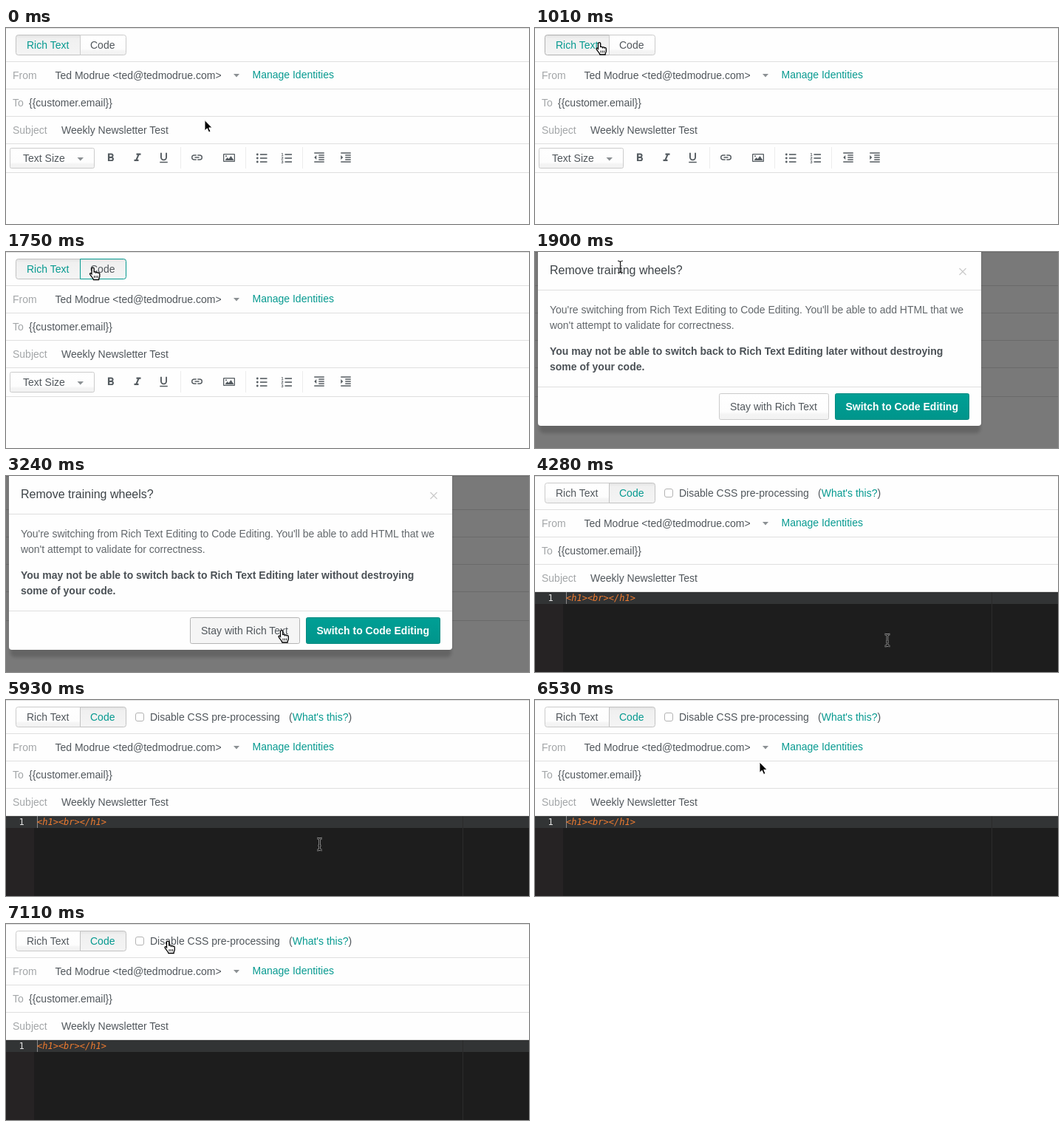
Animation, 708 px wide and 265 px high, one loop 8000 ms. Source, as an HTML page:

```html
<!DOCTYPE html>
<html lang="en">
<head>
<meta charset="utf-8">
<title>Message editor</title>
<style>
html, body { margin: 0; width: 100%; height: 100%; overflow: hidden; background: #fefefe; }
svg { display: block; width: 708px; height: 265px; }
text { font: 14px "Liberation Sans", Arial, sans-serif; fill: #51575c; white-space: pre; }
.dim { fill: #a3a6a8; }
.link { fill: #069a90; }
.title { font-size: 16px; fill: #3d4347; }
.body { fill: #62676b; letter-spacing: -.03px; }
.bold { font-weight: bold; fill: #4b5156; }
.mono { font: 12px "DejaVu Sans Mono", monospace; fill: #e2e2e2; }
.tag { font-style: italic; fill: #ee7b30; }
.rule { stroke: #dfdfdf; fill: none; }
.sep { stroke: #ececec; }
.btn { fill: url(#plain); stroke: #cbcbcb; }
.icon { fill: #555c61; }
.caret { fill: #8b9093; }
.switch { fill: url(#teal); stroke: #00897f; }

.code .rich-only, .rich .code-only, .modal, .cursor { display: none; }
.ask .modal { display: inline; }
.rich .tab-rich, .code .tab-code { fill: url(#pressed); stroke: #c2c2c2; }
.rich .label-rich, .code .label-code { fill: #069a90; }
.over-rich .tab-rich { stroke: #b0b0b0; }
.over-code .tab-code { stroke: #b4b4b4; }
.press-code .tab-code { fill: url(#pressed); stroke: #069a90; }
.over-stay .stay { fill: #f5f5f5; stroke: #b4b4b4; }
.over-switch .switch { fill: #008b82; stroke: #007d75; }
.press-switch .switch { fill: url(#tealDown); stroke: #00786f; }
</style>
</head>
<body>
<svg id="stage" class="rich" viewBox="0 0 708 265">
  <defs>
    <linearGradient id="plain" x2="0" y2="1">
      <stop offset="0" stop-color="#fff"/><stop offset=".7" stop-color="#fdfdfd"/>
      <stop offset=".8" stop-color="#f4f4f4"/><stop offset="1" stop-color="#f2f2f2"/>
    </linearGradient>
    <linearGradient id="pressed" x2="0" y2="1">
      <stop offset="0" stop-color="#e2e2e2"/><stop offset=".18" stop-color="#f0f0f0"/>
      <stop offset="1" stop-color="#f4f4f4"/>
    </linearGradient>
    <linearGradient id="teal" x2="0" y2="1">
      <stop offset="0" stop-color="#009f95"/><stop offset="1" stop-color="#00958b"/>
    </linearGradient>
    <linearGradient id="tealDown" x2="0" y2="1">
      <stop offset="0" stop-color="#007b73"/><stop offset=".15" stop-color="#008880"/>
      <stop offset="1" stop-color="#00847c"/>
    </linearGradient>
    <filter id="soft" x="-5%" width="110%" y="-10%" height="120%"><feGaussianBlur stdDeviation="2"/></filter>
  </defs>

  <rect width="708" height="265" fill="#fefefe"/>
  <path class="rule" d="M0 .5H708M0 45.5H708M0 82.5H708M0 119.5H708M0 156.5H708"/>

  <path class="btn tab-rich" d="M100.5 9.5H16.5a3 3 0 0 0-3 3v21a3 3 0 0 0 3 3h84z"/>
  <path class="btn tab-code" d="M100.5 9.5h59a3 3 0 0 1 3 3v21a3 3 0 0 1-3 3h-59z"/>
  <text class="label-rich" x="28" y="28">Rich Text</text>
  <text class="label-code" x="114" y="28">Code</text>

  <g class="code-only">
    <rect x="175.500" y="17.500" width="11" height="11" rx="2.500" fill="#fff" stroke="#b3b3b3"/>
    <text x="195" y="28">Disable CSS pre-processing</text>
    <text x="383" y="28">(<tspan class="link">What's this?</tspan>)</text>
  </g>

  <text class="dim" x="9" y="69">From</text>
  <text x="66.500" y="69">Ted Modrue &lt;ted@tedmodrue.com&gt;</text>
  <path class="caret" d="M308 62h8l-4 4.500z"/>
  <text class="link" x="333.500" y="68">Manage Identities</text>
  <text class="dim" x="9" y="106">To</text>
  <text x="31" y="106">{{customer.email}}</text>
  <text class="dim" x="9" y="143">Subject</text>
  <text x="75" y="143">Weekly Newsletter Test</text>

  <g class="rich-only">
    <path class="rule" d="M0 195.500H708"/>
    <rect class="btn" x="5.500" y="162.500" width="114" height="27" rx="2"/>
    <text x="23" y="181">Text Size</text>
    <path class="caret" d="M96.500 175h8.500l-4.250 4.500z"/>
    <path class="sep" d="M236.500 161v29M324.500 161v29M401.500 161v29"/>
    <g class="icon" id="icons">
      <path d="M294 171a1 1 0 0 1 1-1h14a1 1 0 0 1 1 1v9a1 1 0 0 1-1 1h-14a1 1 0 0 1-1-1zM295.300 171.300v8.400h13.400v-8.400z" fill-rule="evenodd"/>
      <path d="M296.500 179l3-4 2 2 3-4 4 6z"/><circle cx="298" cy="173.300" r="1"/>
    </g>
  </g>

  <g class="code-only">
    <rect y="157" width="708" height="108" fill="#1d1d1d"/>
    <rect y="157" width="38" height="108" fill="#262324"/>
    <rect y="157" width="708" height="16" fill="#323435"/>
    <path d="M618.500 157V265" stroke="#2b2b2b"/>
    <path d="M42.500 157v16" stroke="#8a8a8a"/>
    <text class="mono" x="17.500" y="169">1</text>
    <text class="mono tag" x="42" y="169">&lt;h1&gt;&lt;br&gt;&lt;/h1&gt;</text>
  </g>

  <g class="modal">
    <rect width="708" height="265" fill="#000" opacity=".52"/>
    <rect x="6" y="-10" width="597" height="255" rx="6" opacity=".17" filter="url(#soft)"/>
    <rect x="4" y="-10" width="600" height="245" rx="4" fill="#fefefe"/>
    <path class="rule" d="M4 51.500H604M4 182.500H604"/>
    <text class="title" x="20" y="30">Remove training wheels?</text>
    <path d="M574.500 22l9 9m0-9l-9 9" stroke="#cacaca" stroke-width="1.200"/>
    <text class="body" x="20" y="83">You're switching from Rich Text Editing to Code Editing. You'll be able to add HTML that we</text>
    <text class="body" x="20" y="104">won't attempt to validate for correctness.</text>
    <text class="bold" x="20" y="139">You may not be able to switch back to Rich Text Editing later without destroying</text>
    <text class="bold" x="20" y="160">some of your code.</text>
    <rect class="btn stay" x="249.500" y="191.500" width="148" height="35" rx="2"/>
    <text x="264" y="214">Stay with Rich Text</text>
    <rect class="switch" x="406.500" y="191.500" width="181" height="35" rx="2"/>
    <text class="bold" x="420.500" y="214" style="fill:#fff">Switch to Code Editing</text>
  </g>

  <g class="cursor" id="arrow">
    <path d="M0 0V14.300L3.300 11.300 5.600 16.500 8 15.500 5.800 10.400H10.200z" stroke="#fff"/>
  </g>
  <g class="cursor" id="beam" fill="none">
    <path d="M-3.500-8Q0-8 0-6Q0-8 3.500-8M0-6V6M-3.500 8Q0 8 0 6Q0 8 3.500 8M-2 2H2" stroke="#fff" stroke-width="2.600" opacity=".65"/>
    <path d="M-3.500-8Q0-8 0-6Q0-8 3.500-8M0-6V6M-3.500 8Q0 8 0 6Q0 8 3.500 8M-2 2H2" stroke="#111" stroke-width="1.200"/>
  </g>
  <g class="cursor" id="hand" stroke="#000">
    <path d="M3.500 2.200a1.600 1.600 0 0 1 3.200 0V7c.3-1 2.600-1 2.800.3.500-.8 2.400-.7 2.600.6.600-.6 2.200-.4 2.200 1.100v3.200c0 1.500-1.200 2.400-1.200 4.800H6c-.5-2.300-3.500-4.900-4.800-7.200-.7-1.300.8-2.200 1.800-1.200l.5.600z" fill="#fff" stroke-width="1.300"/>
    <path d="M7 11.500v3M9.300 11.500v3M11.600 11.500v3" fill="none" stroke-width=".9"/>
  </g>
</svg>
<script>
const LOOP = 8000;
const $ = id => document.getElementById(id);
const stage = $('stage');

// toolbar glyphs on a 24-unit grid: centre x, centre y, outline
const bars = 'M11 17h10v-2H11zM3 21h18v-2H3zM3 3v2h18V3zM11 9h10V7H11zM11 13h10v-2H11z';
const glyphs = [
  [141.7, 175.5, 'M15.6 10.8c1-.7 1.6-1.800 1.600-2.800 0-2.300-1.700-4-4-4H7v14h7c2.100 0 3.700-1.700 3.700-3.800 0-1.500-.8-2.800-2.100-3.400zM10 6.500h3a1.500 1.500 0 0 1 0 3h-3zm3.500 9H10v-3h3.500a1.500 1.500 0 0 1 0 3z'],
  [178, 175.5, 'M10 4v3h2.200l-3.400 8H6v3h8v-3h-2.200l3.400-8H18V4z'],
  [213.5, 175.5, 'M12 17a6 6 0 0 0 6-6V3h-2.500v8a3.500 3.500 0 0 1-7 0V3H6v8a6 6 0 0 0 6 6zm-7 2v2h14v-2z'],
  [258.5, 175, 'M3.900 12A3.100 3.100 0 0 1 7 8.900h4V7H7a5 5 0 0 0 0 10h4v-1.900H7A3.100 3.100 0 0 1 3.900 12zM8 13h8v-2H8zM17 7h-4v1.900h4a3.100 3.100 0 0 1 0 6.200h-4V17h4a5 5 0 0 0 0-10z'],
  [424, 175, bars + 'M3 12l4 4V8z'],
  [460, 175, bars + 'M3 8v8l4-4z']
];

function add(tag, attrs, text = '') {
  const el = document.createElementNS(stage.namespaceURI, tag);
  for (const key in attrs) el.setAttribute(key, attrs[key]);
  el.textContent = text;
  $('icons').append(el);
}

for (const [x, y, d] of glyphs) add('path', { d, transform: `translate(${x - 9} ${y - 9}) scale(.75)` });
for (let i = 0; i < 3; i++) {
  const y = 171 + 5 * i;
  add('circle', { cx: 340.3, cy: y, r: 1.4 });
  add('rect', { x: 344, y: y - .8, width: 9.5, height: 1.6 });
  add('rect', { x: 377.5, y: y - .8, width: 9.5, height: 1.6 });
  add('text', { x: 372.5, y: y + 2, style: 'font-size:5.5px;font-weight:bold' }, i + 1);
}

const scenes = [
  [0, 'rich'],
  [1010, 'rich over-rich'],
  [1160, 'rich over-code'],
  [1750, 'rich press-code'],
  [1900, 'rich ask'],
  [3240, 'rich ask over-stay'],
  [3540, 'rich ask over-switch'],
  [4130, 'rich ask press-switch'],
  [4280, 'code']
];

const moves = [
  [0, 'arrow', 269, 124.5],
  [420, 'arrow', 258, 152],
  [570, 'beam', 222, 231],
  [720, 'beam', 176, 210],
  [870, 'arrow', 124, 104],
  [1010, 'hand', 82, 19],
  [1160, 'hand', 105, 20],
  [1310, 'hand', 112.5, 20.5],
  [1900, 'beam', 115.5, 20],
  [2650, 'beam', 128, 32],
  [2800, 'beam', 190, 88],
  [2950, 'beam', 270, 152],
  [3090, 'arrow', 338, 186],
  [3240, 'hand', 368, 208],
  [3540, 'hand', 450, 217],
  [3690, 'hand', 471.5, 222.5],
  [4280, 'beam', 477, 222],
  [5930, 'beam', 424.5, 195],
  [6080, 'arrow', 312, 92],
  [6530, 'arrow', 304, 84],
  [6680, 'arrow', 274, 62],
  [6820, 'arrow', 242, 40],
  [6970, 'hand', 222, 26],
  [7110, 'hand', 214, 22.5]
];

const latest = (steps, t) => steps.findLast(step => step[0] <= t);

function draw() {
  const t = performance.now() % LOOP;
  stage.setAttribute('class', latest(scenes, t)[1]);
  const [, kind, x, y] = latest(moves, t);
  for (const id of ['arrow', 'beam', 'hand']) $(id).style.display = id === kind ? 'inline' : 'none';
  $(kind).setAttribute('transform', `translate(${x} ${y})`);
  requestAnimationFrame(draw);
}
draw();
</script>
</body>
</html>
```
